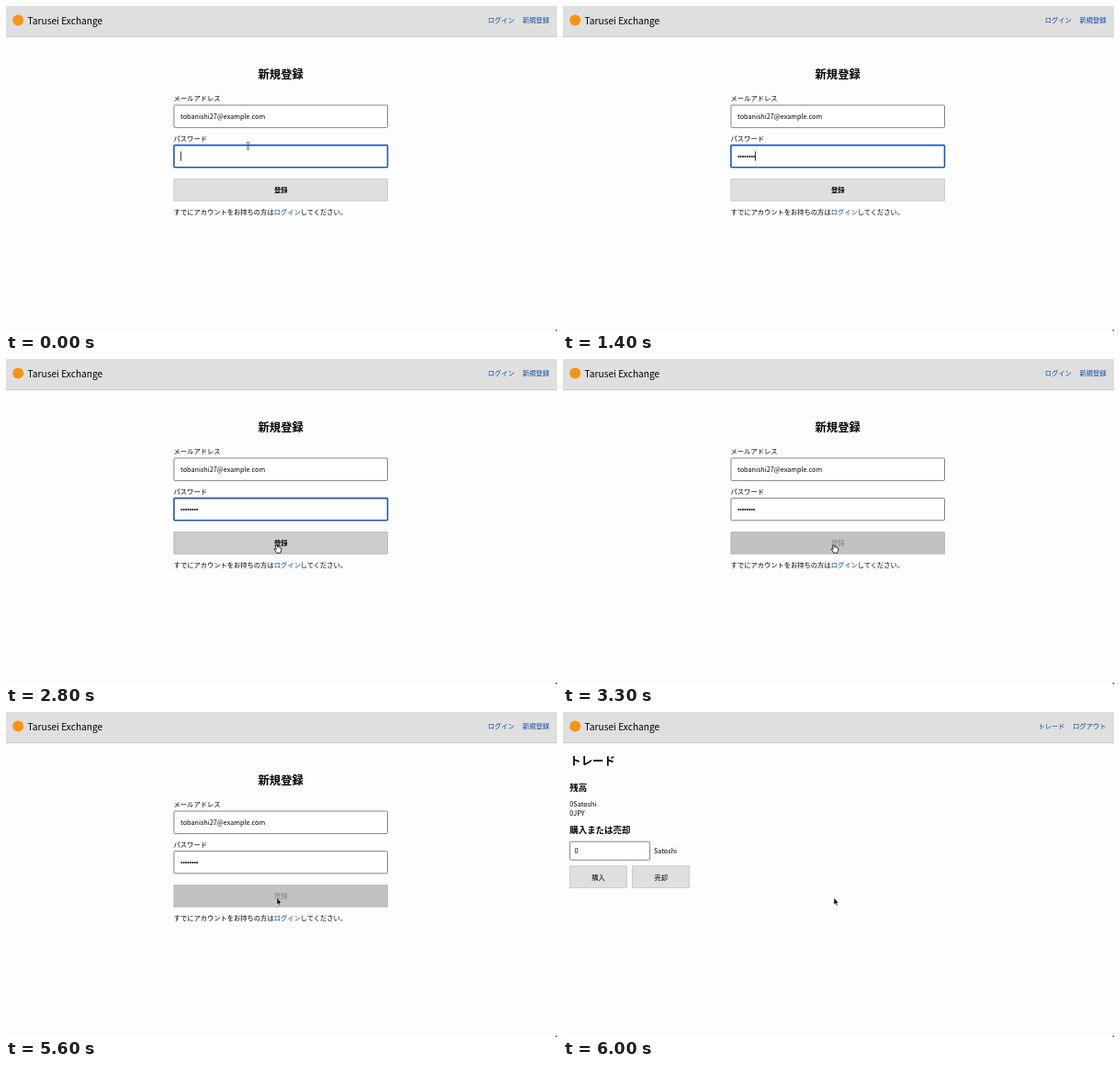
Recreate the animation shown at these times as an HTML page. Size 600x354 px, loop 8000 ms.

```html
<!DOCTYPE html>
<html lang="ja">
<head>
<meta charset="utf-8">
<style>
html, body { margin: 0; width: 100%; height: 100%; overflow: hidden; background: #fdfdfd; }
svg { display: block; width: 600px; height: 354px; font: 7.27px "Noto Sans CJK JP", "Noto Sans CJK", sans-serif; fill: #000; }
.link { fill: #0d47a1; }
.h1 { font-size: 12.36px; font-weight: 700; }
.h2 { font-size: 9.45px; font-weight: 700; }
.mid { text-anchor: middle; }
.end { text-anchor: end; }
.input { fill: #fff; stroke: #767676; stroke-width: .9; }
.button { fill: #dfdfdf; stroke: #c8c8c8; stroke-width: .9; }
.pointer { fill: #fff; stroke: #000; stroke-width: .8; stroke-linejoin: round; }
</style>
</head>
<body>
<svg viewBox="0 0 600 354">
  <rect width="600" height="33.5" fill="#dfdfdf"/>
  <rect y="33" width="600" height="1" fill="#cbcbcb"/>
  <circle cx="13.2" cy="15.4" r="6" fill="#f7931a"/>
  <text x="23.6" y="19.6" font-size="10.18">Tarusei Exchange</text>
  <path d="M600 352v2h-2z" fill="#333"/>

  <g id="signup">
    <text class="link end" x="553.7" y="18.3">ログイン</text>
    <text class="link end" x="591.5" y="18.3">新規登録</text>
    <text class="h1 mid" x="299.2" y="79.2">新規登録</text>
    <text x="182.6" y="103.4">メールアドレス</text>
    <rect class="input" x="182.9" y="108" width="232.6" height="24.4" rx="1"/>
    <text x="190" y="123">tobanishi27@example.com</text>
    <text x="182.6" y="147">パスワード</text>
    <rect class="input" id="field" x="182.9" y="151.6" width="232.6" height="24.2" rx="1"/>
    <g id="dots"></g>
    <rect id="caret" y="158.3" width=".8" height="10.4"/>
    <rect class="button" id="submit" x="182.9" y="188.6" width="232.6" height="23.6"/>
    <text class="mid" id="label" x="299.2" y="203.3" font-weight="700">登録</text>
    <text x="182.6" y="226.8">すでにアカウントをお持ちの方は<tspan class="link">ログイン</tspan>してください。</text>
  </g>

  <g id="trade">
    <text class="link end" x="546.6" y="18.3">トレード</text>
    <text class="link end" x="591.5" y="18.3">ログアウト</text>
    <text class="h1" x="7.3" y="58.4">トレード</text>
    <text class="h2" x="7.3" y="85.6">残高</text>
    <text x="7.3" y="102.5">0Satoshi</text>
    <text x="7.3" y="112.8">0JPY</text>
    <text class="h2" x="7.3" y="132">購入または売却</text>
    <rect class="input" x="7.4" y="141.2" width="87.2" height="20" rx="1"/>
    <text x="12.4" y="154.2">0</text>
    <text x="98.9" y="154.2">Satoshi</text>
    <rect class="button" x="7.4" y="167.8" width="62.2" height="23.6"/>
    <text class="mid" x="38.4" y="182.7" font-weight="500">購入</text>
    <rect class="button" x="75.6" y="167.8" width="62.2" height="23.6"/>
    <text class="mid" x="106.7" y="182.7" font-weight="500">売却</text>
  </g>

  <g id="mouse">
    <path id="beam" d="M-1.8-3.7q1.5 0 1.8.7q.3-.7 1.8-.7M0-3v6.4M-1.8 4q1.5 0 1.8-.7q.3.7 1.8.7" fill="none" stroke="#333" stroke-width=".8"/>
    <path id="hand" class="pointer" d="M-1.4-3q.9-.8 1.4.3l.6 2q.9-.7 1.4.1q1-.4 1.4.3q1.1-.2 1.1.9v2.2l-.8 1.5v1.2h-4.2l-.5-1.3l-2-2.5q-.2-1.2 1.1-.7l1 .8l-.9-3.6q-.1-.8.8-1.2z"/>
    <path id="arrow" d="M-.2-3.2v7.4l1.7-1.6l1.2 2.7l1.2-.5l-1.2-2.6h2.3z" stroke="#fff" stroke-width=".5"/>
  </g>
</svg>
<script>
const $ = id => document.getElementById(id);
const show = (id, on) => $(id).style.display = on ? "" : "none";
const clamp = x => Math.max(0, Math.min(1, x));
const gray = v => `rgb(${v},${v},${v})`;

const LOOP = 8000, PITCH = 2.42;
const keys = [100, 500, 550, 600, 900, 1000, 1100, 1400];
$("dots").innerHTML = keys.map((_, i) =>
  `<circle cx="${191.2 + i * PITCH}" cy="164" r=".95"/>`).join("");

function draw(now) {
  const t = Math.floor(now % LOOP / 100) * 100;
  const typed = keys.filter(k => k <= t).length;
  const focused = t < 3000, done = t >= 5700;

  show("signup", !done);
  show("trade", done);
  [...$("dots").children].forEach((dot, i) => dot.style.display = i < typed ? "" : "none");
  $("caret").setAttribute("x", 189.9 + typed * PITCH);
  show("caret", t < 1800 || t >= 2300 && t < 2800);
  $("field").style.stroke = focused ? "#1f57ab" : "";
  $("field").style.strokeWidth = focused ? 1.6 : "";

  // the pointer hides while typing, then eases down to the button
  const p = clamp((t - 1700) / 300), ease = p * p * (3 - 2 * p);
  const x = 263.6 + 31.6 * ease, y = 152.2 + 53.6 * ease;
  const inField = y < 176, onButton = y > 188.5 && t < 5600;
  $("mouse").setAttribute("transform", `translate(${x} ${y})`);
  show("mouse", t < 100 || t >= 1700);
  show("beam", inField);
  show("hand", onButton);
  show("arrow", !inField && !onButton);

  const press = clamp((t - 2900) / 400);
  const hover = t >= 1900;
  $("submit").style.fill = gray(hover ? Math.round(204 - 10 * press) : 223);
  $("submit").style.stroke = gray(hover ? 182 : 200);
  $("label").style.fill = gray(Math.round(148 * press));
  requestAnimationFrame(tick);
}

const start = performance.now();
const tick = () => draw(performance.now() - start);
tick();
</script>
</body>
</html>
```
